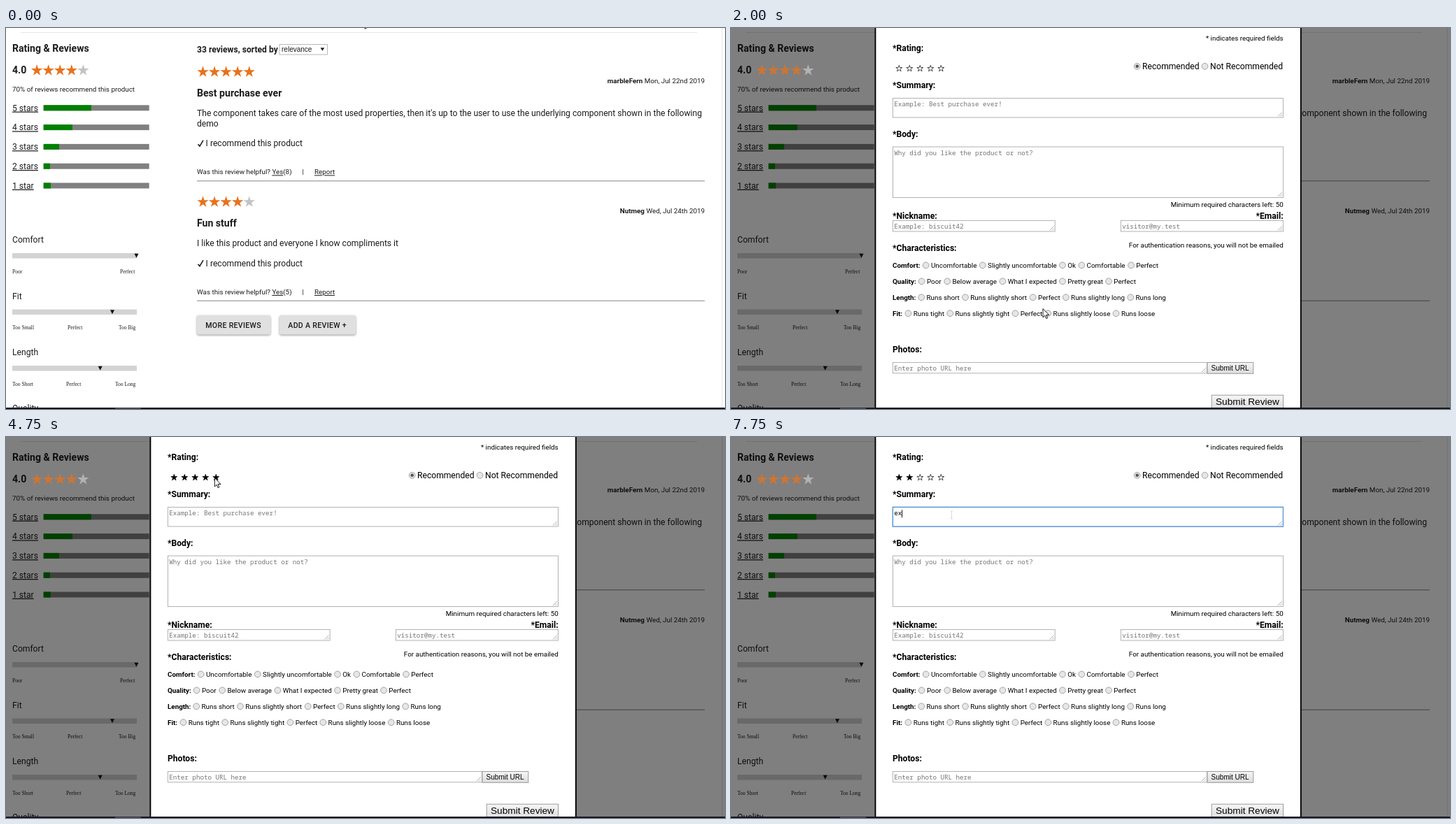
An HTML page for the animation above (8000 ms loop, 1028 px wide and 545 px high).

```html
<!DOCTYPE html>
<html lang="en">
<head>
<meta charset="utf-8">
<title>Product reviews</title>
<style>
html, body { margin: 0; width: 100%; height: 100%; overflow: hidden; background: #fff; }
svg { display: block; width: 1028px; height: 545px; font-family: Roboto, sans-serif; fill: #1c1c1c; }
text { white-space: pre; }
.b { font-weight: 700; }
.u { text-decoration: underline; }
.serif { font-family: "Liberation Serif", serif; }
.arial { font-family: "Liberation Sans", sans-serif; }
.mono { font-family: "Noto Sans Mono", monospace; fill: #757575; }
.btn { font-weight: 500; letter-spacing: .02857em; }
.raised { filter: drop-shadow(0 1.3px 1.4px rgba(0,0,0,.42)); }
.focus { stroke: #5a95d6; stroke-width: 1.3; filter: drop-shadow(0 0 .7px #6aa5e8); }
#modal { fill: #000; }
</style>
</head>
<body>
<svg id="stage" viewBox="0 0 1028 545">
  <defs>
    <linearGradient id="face" x2="0" y2="1"><stop stop-color="#f6f6f6"/><stop offset="1" stop-color="#dcdcdc"/></linearGradient>
  </defs>
  <g id="page"></g>
  <g id="modal"></g>
  <g id="score"></g>
  <g id="edge"></g>
  <path id="arrow" d="M0 0V16.6L3.8 13L6.4 18.8L8.8 17.7L6.3 12H11.6Z" fill="#fff" stroke="#000" stroke-width="1.2"/>
  <path id="beam" d="M-1.5 0H1.5M0 0V10.5M-1.5 10.5H1.5" stroke="#d0d0d0" stroke-width=".8"/>
</svg>
<script>
const $ = id => document.getElementById(id);
const SMALL = 9.83, BASE = 12.11, HEAD = 14.09, TINY = 7.53, FORM = 10.03, MONO = 9.2;

const text = (x, y, s, size = BASE, cls = '', anchor = 'start') =>
  `<text x="${x}" y="${y}" font-size="${size}" class="${cls}" text-anchor="${anchor}">${s}</text>`;
const rect = (x, y, w, h, fill, more = '') =>
  `<rect x="${x}" y="${y}" width="${w}" height="${h}" fill="${fill}" ${more}/>`;
const span = (cls, s) => `<tspan class="${cls}">${s}</tspan>`;

const star = (cx, cy, size, more) => {
  const points = Array.from({ length: 10 }, (_, i) => {
    const r = i % 2 ? size * .39 : size, a = i * Math.PI / 5;
    return `${(cx + r * Math.sin(a)).toFixed(2)},${(cy - r * Math.cos(a)).toFixed(2)}`;
  });
  return `<polygon points="${points.join(' ')}" ${more}/>`;
};

// Five large rating stars, the first n of them lit
const bigStars = (x, y, n) => [0, 1, 2, 3, 4].map(i =>
  star(x + 8.1 + i * 16.56, y, 8.6, `fill="${i < n ? '#e8721c' : '#c3c3c3'}"`)).join('');

function review(y, n, title, name, date, lines, votes) {
  const end = y + lines.length * 14.4;
  let out = bigStars(273.4, y + .6, n)
    + text(999, y + 17, span('b', name) + ' ' + date, SMALL, '', 'end')
    + text(273, y + 35.5, title, HEAD, 'b');
  lines.forEach((s, i) => out += text(273, y + 64 + i * 14.4, s));
  out += `<path d="M274.5 ${end + 75.2}L277 ${end + 78}L282 ${end + 69.5}" fill="none" stroke="#1c1c1c" stroke-width="1.6"/>`
    + text(285.6, end + 78.3, 'I recommend this product')
    + text(273, end + 118.3, `Was this review helpful? ${span('u', 'Yes')}(${votes})`, SMALL)
    + text(423.5, end + 118.3, '|', SMALL)
    + text(441, end + 118.3, 'Report', SMALL, 'u')
    + rect(273, end + 126.9, 726, 1.4, '#a8a8a8');
  return out;
}

function slider(y, title, mark, labels) {
  return text(9, y, title) + rect(9, y + 15, 178, 7.5, '#d3d3d3')
    + `<path d="M${mark - 3} ${y + 15.8}h6l-3 6z" fill="#111"/>`
    + labels.map(([x, s]) => text(x, y + 43.8, s, TINY, 'serif')).join('');
}

function buildPage() {
  let out = rect(21, 6, 967, 1, '#e6e6e6') + rect(1023.5, 0, 1, 545, '#e4e4e4')
    + text(9, 34.3, 'Rating &amp; Reviews', HEAD, 'b')
    + text(9, 65.2, '4.0', HEAD, 'b')
    + text(9, 90.5, '70% of reviews recommend this product', SMALL);
  [122, 95, 76, 63, 64].forEach((end, i) => {
    const y = 114.3 + i * 27.8, n = 5 - i;
    out += text(9, y + 4.3, n + (n > 1 ? ' stars' : ' star'), BASE, 'u')
      + rect(53.7, y - 4, 151, 8, '#808080') + rect(53.7, y - 4, end - 53.7, 8, '#008000');
  });
  out += slider(307, 'Comfort', 186.5, [[9, 'Poor'], [163, 'Perfect']])
    + slider(387.5, 'Fit', 152, [[9, 'Too Small'], [88, 'Perfect'], [161, 'Too Big']])
    + slider(468, 'Length', 134.7, [[9, 'Too Short'], [86, 'Perfect'], [156, 'Too Long']])
    + text(9, 548.3, 'Quality')
    + text(273, 34.8, '33 reviews, sorted by', BASE, 'b')
    + rect(391, 23.4, 68.5, 14.6, '#fff', 'stroke="#a6a6a6" stroke-width=".8"')
    + text(394, 34, 'relevance', FORM, 'arial')
    + '<path d="M449.6 28.2h5.6l-2.8 4.6z"/>'
    + review(62.3, 5, 'Best purchase ever', 'marbleFern', 'Mon, Jul 22nd 2019',
      ["The component takes care of the most used properties, then it's up to the user to use the underlying component shown in the following", 'demo'], 8)
    + review(248.3, 4, 'Fun stuff', 'Nutmeg', 'Wed, Jul 24th 2019',
      ['I like this product and everyone I know compliments it'], 5);
  [[273, 105, 'MORE REVIEWS', 'more'], [391, 109, 'ADD A REVIEW +', 'add']].forEach(([x, w, s, id]) =>
    out += rect(x, 411, w, 27.5, '#e0e0e0', `rx="3" class="raised" id="${id}"`)
      + text(x + 12.3, 428.6, s, 10.6, 'btn'));
  return out;
}

const area = (x, y, w, h, hint, id = 'field' + y + x) => {
  const r = x + w - 1.5, b = y + h - 1.5;
  return rect(x, y, w, h, '#fff', `stroke="#a9a9a9" stroke-width=".9" id="${id}"`)
    + `<path d="M${r - 6} ${b}L${r} ${b - 6}M${r - 2.6} ${b}L${r} ${b - 2.6}" stroke="#888" stroke-width=".7"/>`
    + `<g id="${id}Text">${text(x + 1.9, y + 11.8, hint, MONO, 'mono')}</g>`;
};
const radio = (x, y, on) =>
  `<circle cx="${x}" cy="${y}" r="4.4" fill="#e6e6e6" stroke="#9a9a9a" stroke-width=".9"/>`
  + (on ? `<circle cx="${x}" cy="${y}" r="2.3" fill="#555"/>` : '');
const push = (x, y, w, h) => rect(x, y, w, h, 'url(#face)', 'stroke="#9c9c9c" stroke-width="1"');

function buildModal() {
  let out = rect(0, 0, 1028, 545, '#000', 'opacity=".5"')
    + rect(206.4, -5, 608.4, 560, '#fff', 'stroke="#000" stroke-width="1.9"')
    + text(789.7, 18.2, '* indicates required fields', SMALL, '', 'end')
    + text(231, 33, '*Rating:', BASE, 'b')
    + [0, 1, 2, 3, 4].map(i => star(240.3 + i * 15, 58, 4.7, 'class="pick" stroke="#000" stroke-width=".7"')).join('')
    + radio(580.7, 54.8, true) + text(588, 59.3, 'Recommended')
    + radio(677.5, 54.8) + text(685, 59.3, 'Not Recommended')
    + text(231, 86, '*Summary:', BASE, 'b')
    + area(231.4, 100.4, 558, 27.6, 'Example: Best purchase ever!', 'summary')
    + rect(243.6, 104.3, .9, 11, '#000', 'id="caret"')
    + text(231, 155.6, '*Body:', BASE, 'b')
    + area(231.4, 170, 558, 72.6, 'Why did you like the product or not?')
    + text(789.7, 255.7, 'Minimum required characters left: 50', SMALL, '', 'end')
    + text(231, 272.8, '*Nickname:', BASE, 'b')
    + text(789.7, 272.8, '*Email:', BASE, 'b', 'end')
    + area(231.4, 275.4, 231.8, 15.6, 'Example: biscuit42')
    + area(557.4, 275.4, 232, 15.6, 'visitor@my.test')
    + text(789.7, 313.8, 'For authentication reasons, you will not be emailed', SMALL, '', 'end')
    + text(231, 318.7, '*Characteristics:', BASE, 'b');
  [
    ['Comfort', [278.7, 'Uncomfortable', 359.8, 'Slightly uncomfortable', 474, 'Ok', 501.3, 'Comfortable', 572, 'Perfect']],
    ['Quality', [272.6, 'Poor', 309.2, 'Below average', 388.4, 'What I expected', 474, 'Pretty great', 540, 'Perfect']],
    ['Length', [272.2, 'Runs short', 335, 'Runs slightly short', 431.7, 'Perfect', 478.8, 'Runs slightly long', 571.2, 'Runs long']],
    ['Fit', [253.4, 'Runs tight', 313.2, 'Runs slightly tight', 406.4, 'Perfect', 453.3, 'Runs slightly loose', 550.6, 'Runs loose']]
  ].forEach(([name, opts], row) => {
    const y = 339.4 + row * 22.95;
    out += text(231, y + 3.4, name + ':', SMALL, 'b');
    for (let i = 0; i < opts.length; i += 2)
      out += radio(opts[i], y, false) + text(opts[i] + 7.3, y + 3.4, opts[i + 1], SMALL);
  });
  return out + text(231, 463.8, 'Photos:', BASE, 'b')
    + area(231.4, 478.4, 449, 15.4, 'Enter photo URL here')
    + push(681, 478.5, 65.8, 15.8) + text(686.6, 490, 'Submit URL', FORM, 'arial')
    + push(687.2, 525.2, 102.3, 21) + text(693, 539.1, 'Submit Review', 13.65, 'arial');
}

$('page').innerHTML = buildPage();
$('modal').innerHTML = buildModal();
$('score').innerHTML = bigStars(36, 60.7, 4);
$('edge').innerHTML = rect(0, 543, 1028, 2, '#15151a') + rect(156, 543.6, 37, 1.4, '#55555c');

// Pointer: time, x, y, picked stars
const moves = [
  [0, 508.5, -13, 0], [250, 511, 38, 0], [500, 500, 180, 0], [750, 474, 330, 0],
  [1000, 452, 410, 0], [1250, 447.5, 416.5, 0], [2000, 446, 401.5, 0],
  [2250, 418, 318, 0], [2500, 355, 206, 0], [2750, 298, 112, 0], [3000, 262, 60, 2],
  [3250, 248, 40, 0], [3500, 240, 58, 1], [3750, 253.3, 58.5, 2], [4000, 268, 58, 3],
  [4250, 283, 58, 4], [4500, 297, 58, 5], [4750, 298.3, 58.5, 5], [5000, 284, 58, 4],
  [5250, 254, 58, 2], [6000, 288, 84, 2], [6250, 313, 105, 2], [6750, 315.5, 106.3, 2]
];
const picks = [...document.querySelectorAll('.pick')];
const entry = $('summaryText').firstChild;
const HINT = entry.textContent;
const show = (el, on) => el.setAttribute('visibility', on ? 'visible' : 'hidden');

function draw(t) {
  const [, x, y, n] = moves.filter(m => m[0] <= t).pop();
  const open = t >= 2000, focus = t >= 6750, typing = t >= 7500;
  const typed = t >= 7750 ? 'ex' : 'e';
  $('modal').style.display = open ? '' : 'none';
  $('score').setAttribute('opacity', open ? .75 : 1);
  $('add').setAttribute('fill', t >= 1000 ? '#d5d5d5' : '#e0e0e0');
  picks.forEach((p, i) => p.setAttribute('fill', i < n ? '#000' : '#fff'));

  show($('arrow'), t < 6250);
  show($('beam'), t >= 6250);
  $('arrow').setAttribute('transform', `translate(${x} ${y}) scale(.7526)`);
  $('beam').setAttribute('transform', `translate(${x} ${y})`);

  $('summary').classList.toggle('focus', focus);
  entry.textContent = typing ? typed : HINT;
  entry.style.fill = typing ? '#000' : '';
  show($('caret'), open && focus && (t < 7250 || typing));
  $('caret').setAttribute('x', typing ? 233 + typed.length * 5.52 : 233);
}

const start = performance.now();
function tick() {
  draw((performance.now() - start) % 8000);
  requestAnimationFrame(tick);
}
tick();
</script>
</body>
</html>
```
